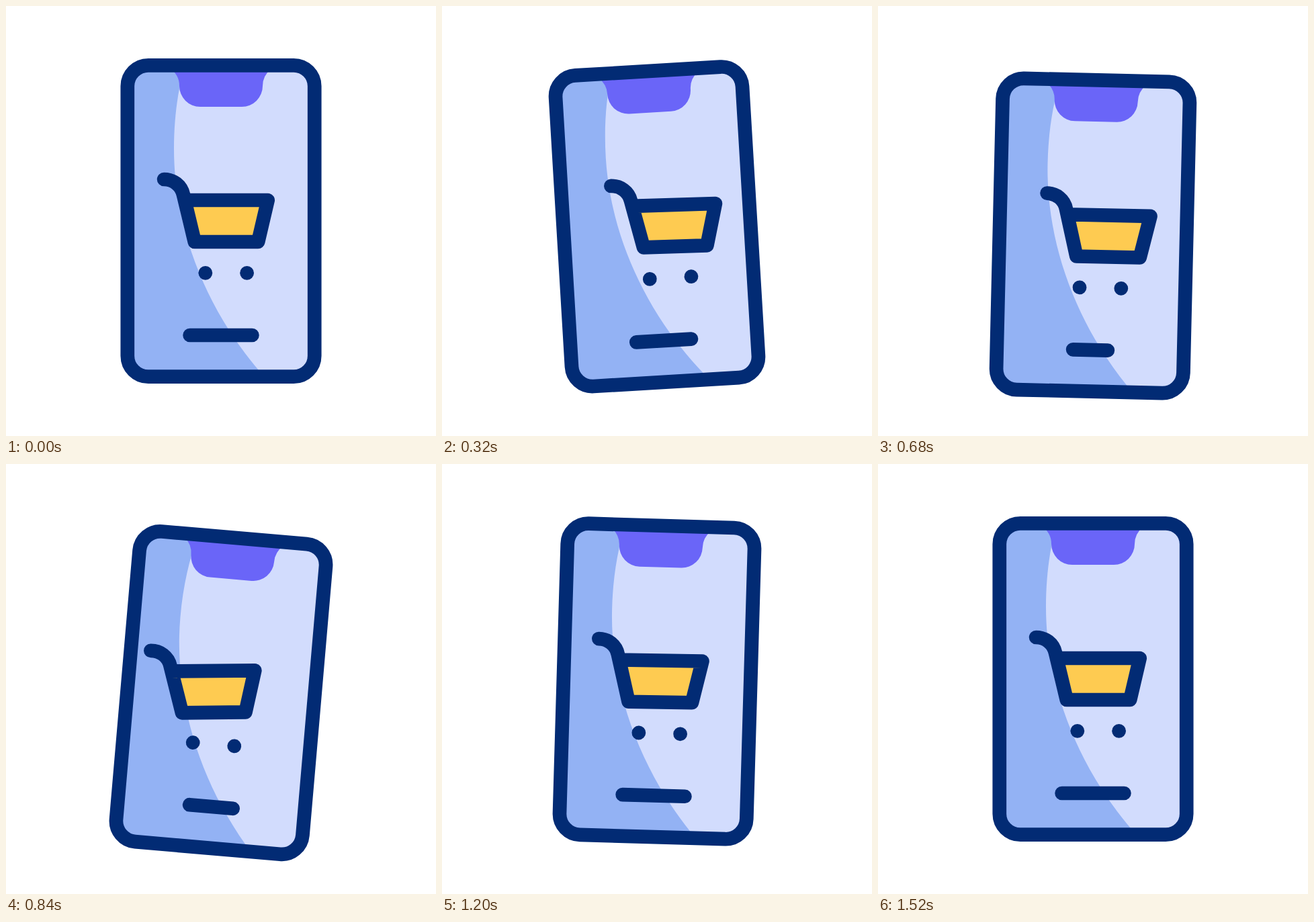
An HTML page for the animation above (1.56 s loop, 640 px wide and 640 px high).

```html
<!DOCTYPE html>
<html lang="en">
<head>
<meta charset="utf-8">
<title>Mobile shopping</title>
<style>
  html, body { margin: 0; height: 100%; overflow: hidden; background: #fff; }
  svg { display: block; width: 100vw; height: 100vh; }
  .line { fill: none; stroke: #022b74; stroke-width: 20.7; stroke-linecap: round; stroke-linejoin: round; }
</style>
</head>
<body>
<svg viewBox="-320 -320 640 640">
  <g id="phone">
    <rect x="-139.2" y="-231.7" width="278.4" height="463.4" rx="31" fill="#d2dcfd"/>
    <path fill="#93b2f4" d="M-54 -231.7C-64 -195 -70 -155 -70 -107C-70 10 -23 129 56 222L64 231.7H-108.2A31 31 0 0 1 -139.2 200.7V-200.7A31 31 0 0 1 -108.2 -231.7Z"/>
    <path fill="#6a65f8" d="M-74 -226Q-62 -216 -62 -201A31 31 0 0 0 -31 -170H31A31 31 0 0 0 62 -201Q62 -216 74 -226Z"/>
    <rect class="line" x="-139.2" y="-231.7" width="278.4" height="463.4" rx="31"/>
    <path id="bar" class="line"/>
    <g id="wheels" fill="#022b74">
      <circle cx="-23.2" cy="77.3" r="10.4"/>
      <circle cx="38.6" cy="77.3" r="10.4"/>
    </g>
    <g id="cart">
      <path fill="#fecb51" d="M-54 -31H69.7L55.2 31H-39.2Z"/>
      <path class="line" d="M-84.9 -62C-71 -62 -59 -53 -56 -39L-39.2 31H55.2L69.7 -31H-54"/>
    </g>
  </g>
</svg>
<script>
const LOOP = 1560, STEP = 40;
const [phone, bar, wheels, cart] =
  ['phone', 'bar', 'wheels', 'cart'].map(id => document.getElementById(id));

// cubic-bezier(.5, 0, .5, 1), solved by bisection
function ease(x) {
  let lo = 0, hi = 1;
  for (let i = 0; i < 24; i++) {
    const u = (lo + hi) / 2;
    if (1.5 * u * (1 - u) + u ** 3 < x) lo = u; else hi = u;
  }
  return lo * lo * (3 - 2 * lo);
}

function draw(now) {
  const t = Math.floor((now % LOOP) / STEP) * STEP;
  const ramp = (from, to) => ease(Math.min(1, Math.max(0, (t - from) / (to - from))));

  // The phone dips while it rocks left, then right
  const drop = 22 * (ramp(40, 680) - ramp(700, 1412));
  const tilt = -4 * ramp(0, 450) + 9 * ramp(450, 870) - 5 * ramp(900, 1412);
  const half = 46.4 - 21 * (ramp(145, 615) - ramp(615, 1160));

  // Cart parts swing one way, across to the other, and home
  const out = ramp(125, 515), across = ramp(515, 895), home = ramp(895, 1315);
  const swing = (a, b) => a * (out - across) + b * (across - home);

  phone.setAttribute('transform', `translate(0 ${drop}) rotate(${tilt})`);
  bar.setAttribute('d', `M${-half} 170H${half}`);
  wheels.setAttribute('transform', `translate(${swing(15.7, -13)} 0)`);
  cart.setAttribute('transform', `translate(${swing(36.5, -21)} 0) rotate(${swing(3.2, -5.8)})`);
}

const start = performance.now();
function frame() {
  draw(performance.now() - start);
  requestAnimationFrame(frame);
}
frame();
</script>
</body>
</html>
```
